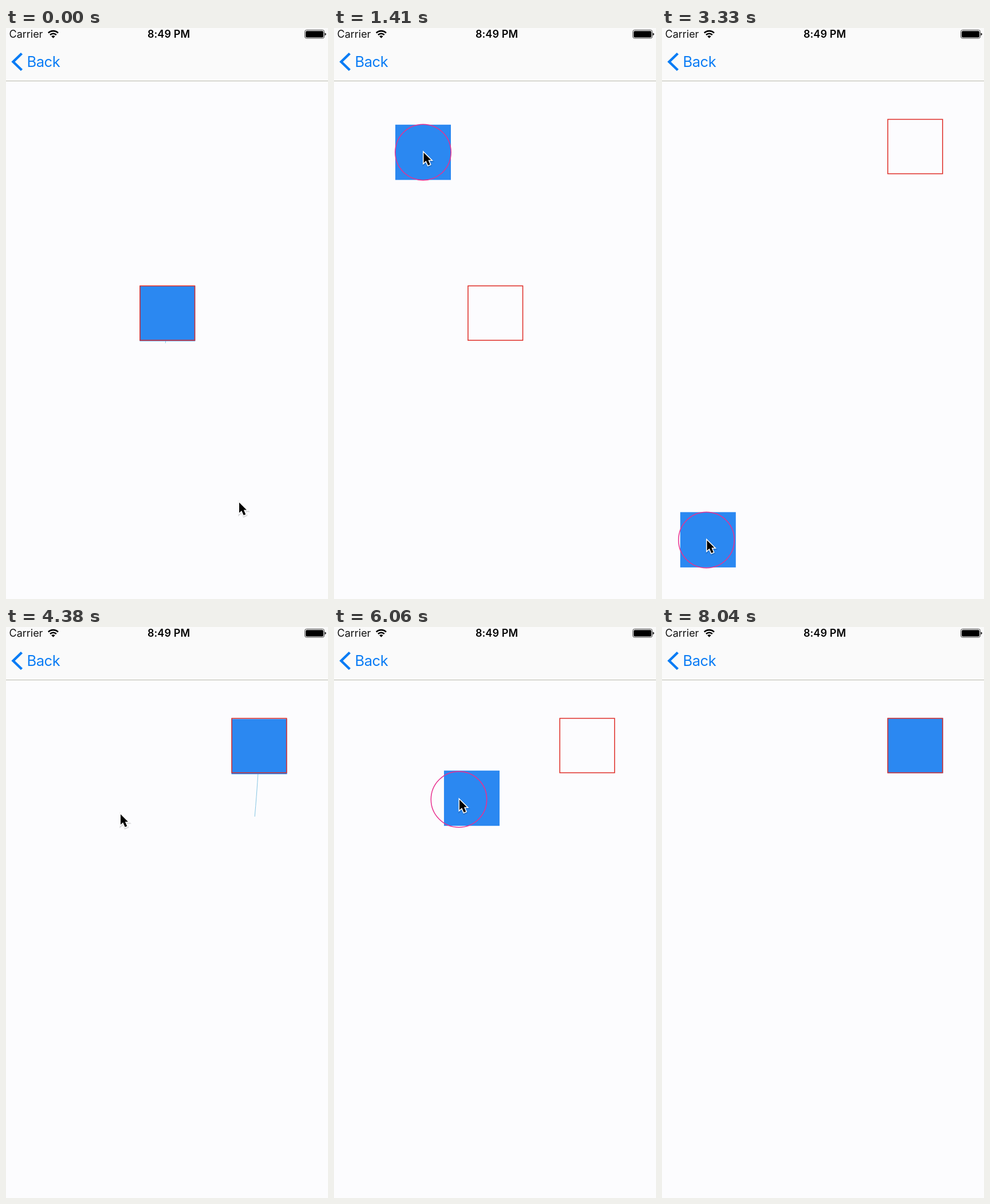
Animation, 562 px wide and 997 px high, one loop 8070 ms. Source, as an HTML page:

```html
<!DOCTYPE html>
<html lang="en">
<head>
<meta charset="utf-8">
<title>Spring drag</title>
<style>
  html, body { margin: 0; width: 100%; height: 100%; overflow: hidden; background: #fcfcfe; }
  svg { display: block; width: 100%; height: 100%; }
  text { font-family: Inter, Roboto, sans-serif; font-size: 18px; }
  .back { font-size: 25.5px; letter-spacing: -.5px; }
</style>
</head>
<body>
<svg viewBox="0 0 562 997" fill="none">
  <rect width="562" height="997" fill="#fcfcfe"/>
  <rect width="562" height="92" fill="#fafafa"/>
  <rect y="92" width="562" height="1" fill="#b8baad"/>

  <text x="5.5" y="17.3" fill="#111">Carrier</text>
  <g stroke="#000" stroke-width="2.6">
    <path d="M73.8 8.6A12.3 12.3 0 0 1 91 8.6"/>
    <path d="M77 12A7.7 7.7 0 0 1 87.8 12"/>
  </g>
  <path d="M82.4 17.8L79.2 14.5A4.6 4.6 0 0 1 85.6 14.5Z" fill="#000"/>
  <text x="284" y="17.3" fill="#000" font-weight="600" text-anchor="middle" letter-spacing=".1">8:49 PM</text>
  <rect x="521.5" y="3.5" width="34" height="14.5" rx="3" stroke="#444"/>
  <rect x="523" y="5.2" width="31" height="11.2" rx="2" fill="#000"/>
  <path d="M556.5 8.5Q558.7 8.8 558.7 10.8T556.5 13.2Z" fill="#111"/>

  <path d="M27.5 44.5L12.5 59L27.5 73.5" stroke="#0a7cf5" stroke-width="4.4"/>
  <text class="back" x="36.6" y="68" fill="#0a7cf5">Back</text>

  <path id="trail" stroke="#86c6e4" stroke-linecap="round" stroke-linejoin="round"/>
  <rect id="box" x="-48.5" y="-48.2" width="97" height="96.5" fill="#2b88f1"/>
  <rect id="home" x="-47.9" y="-47.5" width="95.6" height="95" stroke="#de2a24" stroke-width="1.5"/>
  <circle id="touch" r="48.7" stroke="#e8308f" stroke-width="1.5"/>
  <g id="cursor">
    <use href="#arrow" transform="translate(.5 1.5)" stroke="#000" stroke-opacity=".13" stroke-width="4.5"/>
    <path id="arrow" d="M0 0V18L4.2 14.3L7.7 22.3L11.3 20.7L7.9 12.9H13Z"/>
    <use href="#arrow" fill="#000" stroke="#fff" stroke-width="3" paint-order="stroke"/>
  </g>
</svg>
<script>
const LOOP = 8070, STEP = 30, CURSOR_END = 7920;
const STIFF = 0.016, LAG = 35, CATCH_UP = 60, TRAIL = 320, FADE = 160;

// Turning points of the pointer; everything between is eased
const path = [
  [-530, 233, 842], [0, 406, 828], [240, 505, 912], [810, 470, 470],
  [1350, 155.5, 217], [1500, 155.5, 217], [1800, 300, 210], [2500, 440, 220],
  [3050, 180, 868], [3330, 77.5, 894], [3880, 376, 775], [4380, 199, 326.5],
  [4800, 430, 770], [5104, 444.5, 745], [5160, 191, 696], [5700, 430, 290],
  [6060, 218, 301], [6200, 140, 340], [6490, 300, 702], [7320, 236, 299],
  [7880, 27, 8]
];

const middle = [281.8, 497.8], corner = [442, 207];
const drags = [
  { press: -900, release: -530, home: middle },
  { press: 240, release: 1800, home: corner },
  { press: 2500, release: 3880, home: corner },
  { press: 4650, release: 5104, home: corner },
  { press: 5700, release: 6560, home: corner }
];

const slope = (i, a) => (path[i + 1][a] - path[i][a]) / (path[i + 1][0] - path[i][0]);

// Monotone tangent, so the path never overshoots a point
function tangent(i, a) {
  if (i === 0 || i === path.length - 1) return 0;
  const p = slope(i - 1, a), q = slope(i, a);
  return p * q > 0 ? 2 * p * q / (p + q) : 0;
}

function pointer(time) {
  const last = path.length - 1;
  const t = Math.min(Math.max(time, path[0][0]), path[last][0]);
  let i = 0;
  while (i < last - 1 && path[i + 1][0] <= t) i++;
  const span = path[i + 1][0] - path[i][0], u = (t - path[i][0]) / span, v = 1 - u;
  return [1, 2].map(a =>
    path[i][a] * (1 + 2 * u) * v * v + tangent(i, a) * span * u * v * v +
    path[i + 1][a] * u * u * (3 - 2 * u) - tangent(i + 1, a) * span * u * u * v);
}

const mix = (from, to, k) => from + (to - from) * k;
const dragAt = t => drags.findLastIndex(d => d.press <= t);
const restBefore = i => drags[Math.max(0, i - 1)].home;

function boxAt(t) {
  const i = dragAt(t), d = drags[i];
  if (t < d.release) {
    const rest = restBefore(i), k = Math.exp((d.press - t) / CATCH_UP);
    return pointer(t - LAG).map((v, a) => mix(v, rest[a], k));
  }
  // Critically damped spring back to the outline
  const x = STIFF * (t - d.release), left = (1 + x) * Math.exp(-x);
  const [fromX, fromY] = pointer(d.release);
  return [mix(d.home[0], fromX, left ** 1.4), mix(d.home[1], fromY, left)];
}

const [trail, box, home, touch, cursor] =
  ['trail', 'box', 'home', 'touch', 'cursor'].map(id => document.getElementById(id));
const pair = ([x, y]) => `${x.toFixed(2)} ${y.toFixed(2)}`;
const place = (node, point) => node.setAttribute('transform', `translate(${pair(point)})`);

function drawTrail(t, release) {
  const age = t - release, start = Math.max(release, t - TRAIL), points = [];
  if (age > 0 && age < 900) {
    for (let k = 0; k <= 24; k++) points.push(pair(boxAt(mix(start, t, k / 24))));
  }
  trail.setAttribute('d', points.length ? 'M' + points.join('L') : '');
  trail.setAttribute('stroke-width', 1 + 3.4 * Math.max(0, 1 - age / 480));
}

function draw(t) {
  const i = dragAt(t), d = drags[i], down = t < d.release;
  const [x, y] = pointer(t);
  place(box, boxAt(t));
  place(home, down ? restBefore(i) : d.home);
  place(touch, pointer(Math.min(t, d.release)));
  touch.setAttribute('opacity', down ? 1 : Math.max(0, 1 - (t - d.release) / FADE));
  drawTrail(t, d.release);
  place(cursor, [x + 1, y + 0.5]);
  cursor.setAttribute('visibility', t < CURSOR_END ? 'visible' : 'hidden');
}

const begin = performance.now();
function tick() {
  const t = (performance.now() - begin) % LOOP;
  draw(Math.floor(t / STEP) * STEP);
  requestAnimationFrame(tick);
}
tick();
</script>
</body>
</html>
```
